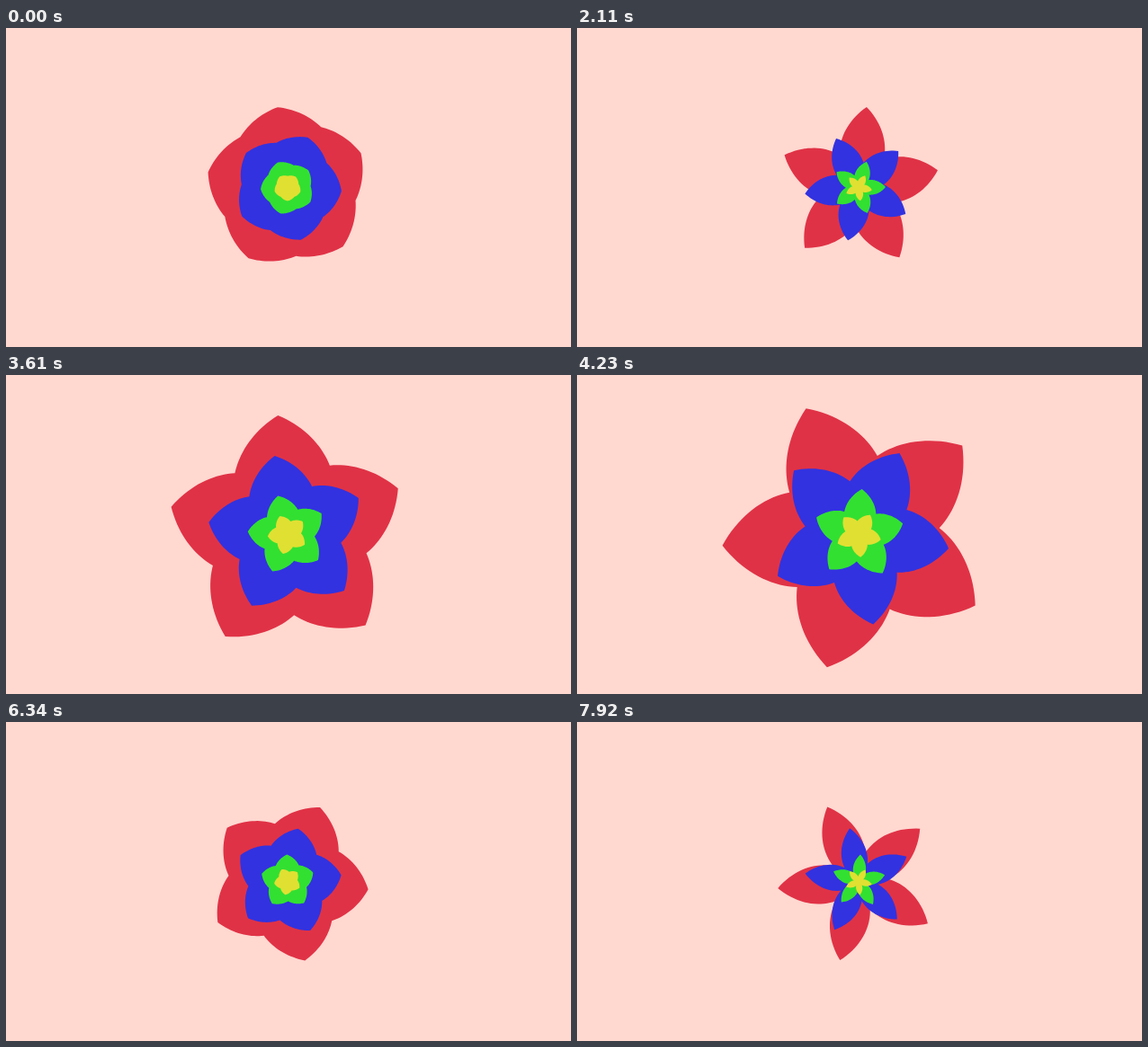
These frames come from a looping animation (628x355 px, 8000 ms). An HTML page:

```html
<!DOCTYPE html>
<html lang="en">
<head>
<meta charset="utf-8">
<title>Spinning flower</title>
<style>
  html, body { margin: 0; width: 100%; height: 100%; overflow: hidden; background: #ffd8d0; }
  svg { display: block; width: 628px; height: 355px; }
</style>
</head>
<body>
<svg id="stage" viewBox="0 0 628 355" xmlns="http://www.w3.org/2000/svg"></svg>
<script>
const LOOP = 8000, STEP = 88;
const CX = 313, CY = 177.5;
const PETALS = 5, HALF = 180 / PETALS, SLICES = 18;
const RAD = Math.PI / 180;

const layers = [
  { radius: 90, speed: 1, color: '#e03246' },
  { radius: 60, speed: 2, color: '#3232e0' },
  { radius: 30, speed: 3, color: '#32e032' },
  { radius: 15, speed: 5, color: '#e0e032' }
];

const stage = document.getElementById('stage');
for (const layer of layers) {
  layer.path = document.createElementNS('http://www.w3.org/2000/svg', 'path');
  layer.path.setAttribute('fill', layer.color);
  stage.appendChild(layer.path);
}

// Radius runs linearly with the angle between moving and fixed corners.
function flower(radius, stretch, turn) {
  const points = [];
  for (let i = 0; i < PETALS * 2 * SLICES; i++) {
    const u = (i / SLICES) % 2;
    const mix = Math.abs(1 - u);
    const r = radius * (1 + (stretch - 1) * mix);
    const a = (turn + i / SLICES * HALF) * RAD;
    points.push((CX + r * Math.sin(a)).toFixed(2) + ' ' + (CY - r * Math.cos(a)).toFixed(2));
  }
  return 'M' + points.join('L') + 'Z';
}

function draw(ms) {
  const tick = Math.floor((ms % LOOP) / STEP);
  const turn = -43.1 - 2.5735 * tick;
  const stretch = 1 + 0.7 * Math.sin((192 + 5.147 * tick) * RAD);
  for (const { path, radius, speed } of layers) {
    path.setAttribute('d', flower(radius, stretch, turn * speed));
  }
}

const start = performance.now();
function loop() {
  draw(performance.now() - start);
  requestAnimationFrame(loop);
}
loop();
</script>
</body>
</html>
```
